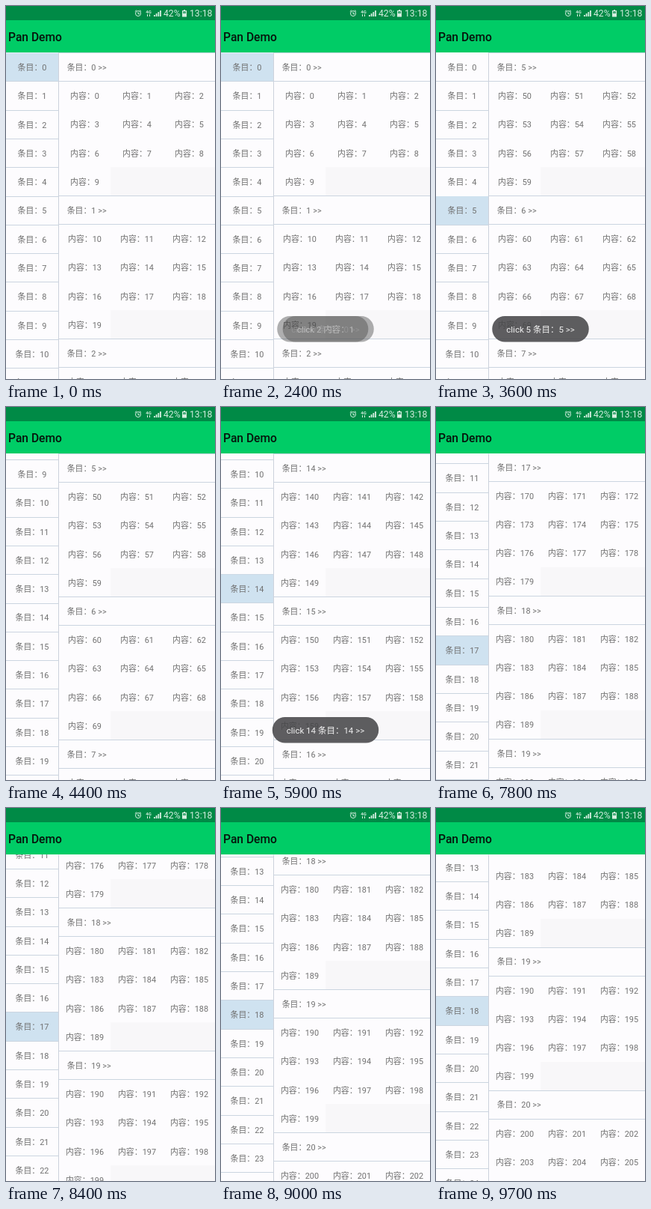
Animation of 280x498 px, one loop 9.8 s. Source, as an HTML page with a canvas:

```html
<!DOCTYPE html>
<html lang="zh-CN">
<head>
<meta charset="utf-8">
<style>
html, body { margin: 0; width: 100%; height: 100%; overflow: hidden; }
canvas { display: block; }
</style>
</head>
<body>
<canvas id="stage" width="280" height="498"></canvas>
<script>
const ctx = document.getElementById('stage').getContext('2d');
const FONT = 'Roboto, "Noto Sans CJK SC", "Noto Sans CJK", sans-serif';
const LOOP = 9800, TOP = 62.5, SIDE = 70, ITEM = 38.3, ROW = 38.2, GROUP = 191;

// Scroll positions: [time, value]; a repeated time is a jump.
const SIDE_SCROLL = [[4000, 0], [4100, 95], [4200, 205], [4300, 290], [4400, 336.7], [4600, 366],
  [4800, 375], [7500, 375], [8100, 440.6], [8500, 440.6], [8800, 485], [9100, 500]];
const MAIN_SCROLL = [[3200, 0], [3200, 955], [5200, 955], [5200, 2674], [6200, 2674], [6400, 2785],
  [6600, 2839], [7200, 2839], [7400, 2985], [7700, 3210], [8000, 3325], [8400, 3367],
  [8700, 3410], [9100, 3462], [9200, 3462], [9400, 3495], [9600, 3505.5]];
const TOASTS = [[1300, 2550, 'click 0 条目：0 >>'], [2250, 3600, 'click 2 内容：1'],
  [3300, 4250, 'click 5 条目：5 >>'], [5250, 6600, 'click 14 条目：14 >>'],
  [6750, 7395, 'click 165 条目：15 >>']];
// Taps: start, end, finger x and y, then x, y and width of the pressed cell.
const TAPS = [[1200, 1500, 175, 82, 70, 62.5, 210], [2100, 2400, 175, 120, 140, 100.7, 70],
  [3000, 3200, 35, 273, 0, 254, 70], [5000, 5200, 35, 243, 0, 224.5, 70],
  [6600, 6800, 175, 108, 70, 88.5, 210]];
// Swipes: start, end, x, first y, last y.
const SWIPES = [[4000, 4300, 36, 420, 150], [6200, 6500, 205, 330, 165], [7200, 7500, 232, 325, 140],
  [8500, 8700, 36, 320, 260], [9200, 9500, 215, 320, 285]];

function track(points, t) {
  const next = points.findIndex(p => p[0] > t);
  if (next < 0) return points[points.length - 1][1];
  if (next === 0) return points[0][1];
  const [t0, a] = points[next - 1], [t1, b] = points[next];
  return a + (b - a) * (t - t0) / (t1 - t0);
}

function rect(x, y, w, h, color) {
  ctx.fillStyle = color;
  ctx.fillRect(x, y, w, h);
}

function text(str, x, y, { size = 10.9, color = '#707070', align = 'center', weight = 400 } = {}) {
  ctx.font = `${weight} ${size}px ${FONT}`;
  ctx.fillStyle = color;
  ctx.textAlign = align;
  ctx.fillText(str, x, y);
}

function circle(x, y, r) {
  ctx.beginPath();
  ctx.arc(x, y, r, 0, 7);
}

const line = (x, y, w) => rect(x, Math.round(y - .5), w, 1, '#cbd5e0');

function drawSide(scroll, selected) {
  for (let i = Math.floor(scroll / ITEM); i * ITEM - scroll < 498; i++) {
    const y = TOP + i * ITEM - scroll;
    if (i === selected) rect(0, y, SIDE, ITEM, '#cfe2f0');
    text('条目：' + i, 35, y + 23.4);
    line(0, y + ITEM, SIDE);
  }
  rect(SIDE, TOP, 1, 436, '#ccd2dc');
}

function drawMain(scroll) {
  for (let g = Math.floor(scroll / GROUP); g * GROUP - scroll < 498; g++) {
    const y = TOP + g * GROUP - scroll;
    line(SIDE, y, 210);
    line(SIDE, y + ROW, 210);
    text(`条目：${g} >>`, 81.7, y + 23.4, { align: 'left' });
    for (let n = 0; n < 10; n++) {
      text('内容：' + (g * 10 + n), 105.5 + n % 3 * 70, y + ROW * (1 + Math.floor(n / 3)) + 23.4);
    }
    rect(140, y + 4 * ROW, 140, ROW, '#f8f7f9');
  }
}

function drawBars() {
  rect(0, 0, 280, 19, '#008a46');
  rect(0, 19, 280, 43, '#00cc66');
  text('Pan Demo', 3, 47, { size: 15.6, color: '#06140c', align: 'left', weight: 500 });
  const pale = '#d5eddf', left = { size: 12.2, color: pale, align: 'left' };
  text('42%', 211, 14.3, left);
  text('13:18', 246, 14.3, left);
  text('4G', 191, 9.5, { size: 6, color: pale, weight: 700 });
  ctx.strokeStyle = pale;
  ctx.lineWidth = 1;
  circle(177, 10, 3.5);
  ctx.moveTo(177, 8); ctx.lineTo(177, 10.5); ctx.lineTo(179, 10.5);
  ctx.moveTo(172.8, 7.5); ctx.lineTo(175, 5.5);
  ctx.moveTo(181.2, 7.5); ctx.lineTo(179, 5.5);
  ctx.moveTo(189.5, 11); ctx.lineTo(189.5, 14);
  ctx.moveTo(192.5, 11); ctx.lineTo(192.5, 14);
  ctx.stroke();
  for (let i = 0; i < 4; i++) rect(198 + i * 2.7, 12 - i * 2, 1.8, 2 + i * 2, pale);
  rect(236, 6, 6, 8.5, pale);
  rect(238, 5, 2, 1, pale);
  rect(237, 7, 4, 3, '#4aac7b');
}

function ring(x, y) {
  circle(x, y, 9.5);
  ctx.fillStyle = 'rgba(255,255,255,.8)';
  ctx.fill();
  ctx.strokeStyle = 'rgba(150,150,155,.25)';
  ctx.lineWidth = 1;
  ctx.stroke();
}

function drawTouches(t) {
  for (const [start, end, x, y, px, py, pw] of TAPS) {
    if (t < start || t >= end) continue;
    rect(px, py, pw, ROW, 'rgba(60,130,180,.12)');
    ring(x, y);
  }
  for (const [start, end, x, y0, y1] of SWIPES) {
    if (t >= start && t < end) ring(x, y0 + (y1 - y0) * (t - start) / (end - start));
  }
}

function drawToast(t, [start, end, label]) {
  const alpha = Math.min(1, (t - start) / 300, (end - t) / 300);
  if (alpha <= 0) return;
  ctx.globalAlpha = alpha;
  ctx.font = `11.5px ${FONT}`;
  const width = ctx.measureText(label).width + 38;
  ctx.fillStyle = 'rgba(71,71,73,.87)';
  ctx.beginPath();
  ctx.roundRect(140 - width / 2, 414, width, 34.5, 17);
  ctx.fill();
  text(label, 140, 435.6, { size: 11.5, color: '#f0f0f0' });
  ctx.globalAlpha = 1;
}

function draw(now) {
  const t = Math.floor(now % LOOP / 100) * 100;
  const scroll = track(MAIN_SCROLL, t);
  rect(0, 0, 280, 498, '#fdfcfe');
  drawMain(scroll);
  drawSide(track(SIDE_SCROLL, t), Math.floor(scroll / GROUP));
  drawTouches(t);
  drawBars();
  TOASTS.forEach(toast => drawToast(t, toast));
}

const begin = performance.now();
function tick() {
  draw(performance.now() - begin);
  requestAnimationFrame(tick);
}
tick();
</script>
</body>
</html>
```
